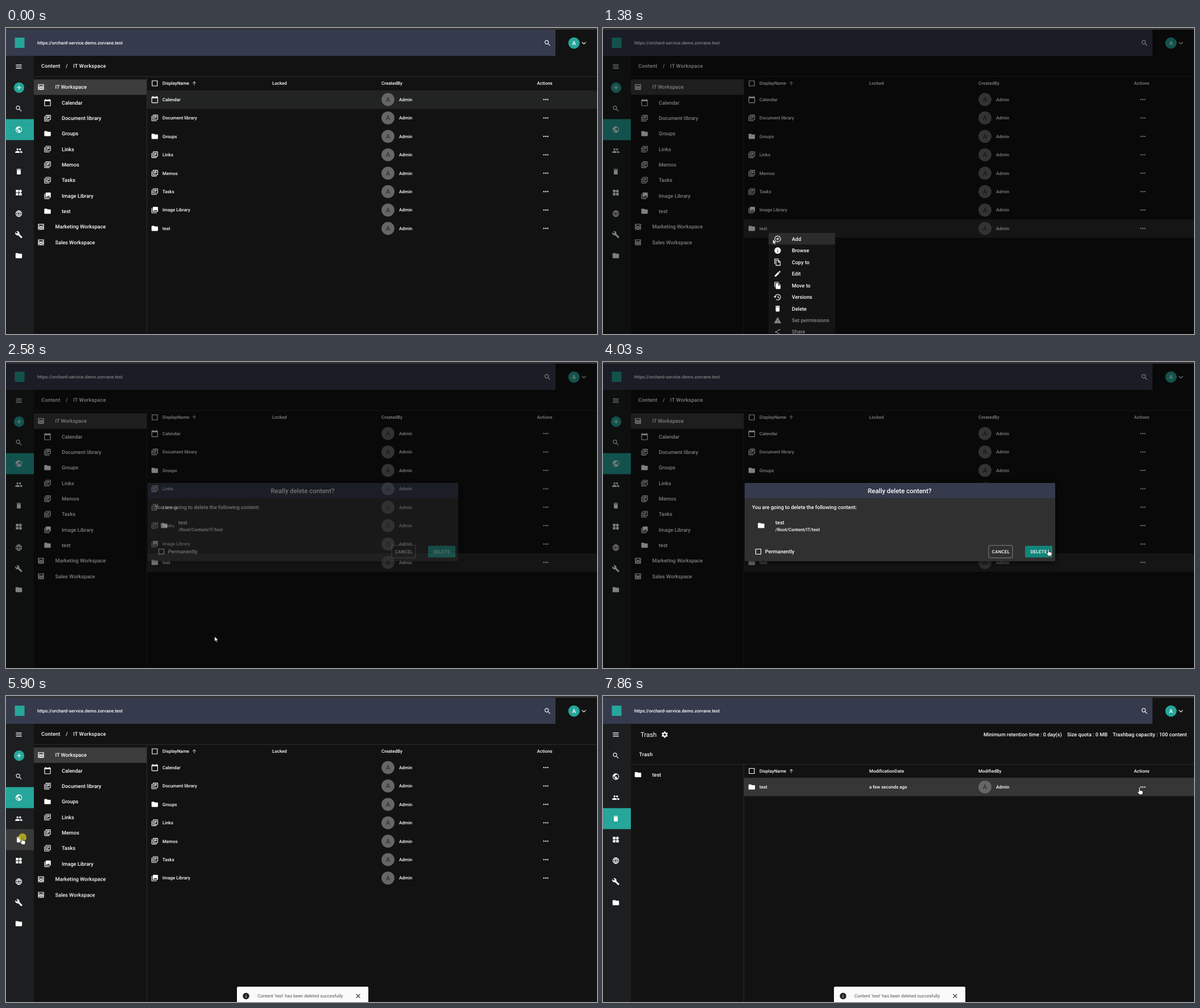
Recreate the animation shown at these times as an HTML page. Size 1039 px wide and 539 px high, loop 8000 ms.

```html
<!DOCTYPE html>
<html lang="en">
<head>
<meta charset="utf-8">
<title>Deleting content</title>
<style>
  html, body { margin: 0; width: 100%; height: 100%; overflow: hidden; background: #121212; }
  svg { display: block; width: 100%; height: 100%; }
  text { font-family: Roboto, Arial, sans-serif; font-weight: 500; text-rendering: geometricPrecision; white-space: pre; }
</style>
</head>
<body>
<svg id="stage" viewBox="0 0 1039 539"></svg>
<script>
const LOOP = 8000;
const TEAL = '#26a69a', BAR = '#363a4d', LINE = '#2d2d2d';
const BODY = 9.1, SMALL = 7.96, TITLE = 11.37;
const SCALE = 0.5685;

// Icons on a 24-unit grid.
const filled = {
  public: 'M12 2a10 10 0 1 0 0 20a10 10 0 1 0 0-20zM11 19.9C7 19.4 4 16 4 12l.2-1.8L9 15v1c0 1.1.9 2 2 2zM17.9 17.4c-.3-.8-1-1.4-1.9-1.4h-1v-3q0-1-1-1H8v-2h2q1 0 1-1V7h2q2 0 2-2v-.4c3 1.2 5 4 5 7.4 0 2-.8 4-2.1 5.4z',
  people: 'M5 8a3 3 0 1 0 6 0a3 3 0 1 0-6 0zM13 8a3 3 0 1 0 6 0a3 3 0 1 0-6 0zM8 13c-2.3 0-7 1.2-7 3.5V19h14v-2.5C15 14.2 10.3 13 8 13zM16 13l-1 .05c1.2.8 2 2 2 3.45V19h6v-2.5C23 14.2 18.3 13 16 13z',
  trash: 'M6 7h12v12q0 2-2 2H8q-2 0-2-2zM19 4h-3.5l-1-1h-5l-1 1H5v2h14z',
  widgets: 'M13 13h8v8h-8zM3 13h8v8H3zM3 3h8v8H3zM16.7 1.7L11 7.3l5.7 5.7 5.6-5.7z',
  build: 'M22.7 19l-9.1-9.1c.9-2.3.4-5-1.5-6.9-2-2-5-2.4-7.4-1.3L9 6 6 9 1.6 4.7C.4 7.1.9 10.1 2.9 12.1c1.9 1.9 4.6 2.4 6.9 1.5l9.1 9.1q.7.6 1.4 0l2.3-2.3q.8-.7.1-1.4z',
  folder: 'M10 4H4Q2 4 2 6v12q0 2 2 2h16q2 0 2-2V8q0-2-2-2h-8z',
  calendar: 'M20 3h-1V1h-2v2H7V1H5v2H4Q2 3 2 5v16q0 2 2 2h16q2 0 2-2V5q0-2-2-2zM20 21H4V8h16z',
  library: 'M4 6H2v14q0 2 2 2h14v-2H4zM20 2H8Q6 2 6 4v12q0 2 2 2h12q2 0 2-2V4q0-2-2-2zM20 16H8V4h12zM10 9h8v2h-8zM10 12h4v2h-4zM10 6h8v2h-8z',
  photos: 'M22 16V4q0-2-2-2H8Q6 2 6 4v12q0 2 2 2h12q2 0 2-2zM11 12l2 2.7L16 11l4 5H8zM2 6v14q0 2 2 2h14v-2H4V6z',
  info: 'M12 2a10 10 0 1 0 0 20a10 10 0 1 0 0-20zM11 7h2v2h-2zM11 11h2v6h-2z',
  move: 'M16 1H4Q2 1 2 3v14h2V3h12zM15 5l6 6v10q0 2-2 2H8q-2 0-2-2V7q0-2 2-2zM14 12h5.5L14 6.5z',
  edit: 'M3 17.25V21h3.75L17.8 9.95l-3.75-3.75zM20.7 7q.6-.7 0-1.4l-2.3-2.3q-.7-.6-1.4 0l-1.9 1.8 3.75 3.75z',
  warning: 'M1 21h22L12 2zM11 10h2v4h-2zM11 16h2v2h-2z'
};
const stroked = {
  menu: 'M3 7h18M3 12h18M3 17h18',
  search: 'M14 14l6 6M15 9.5a5.5 5.5 0 1 1 0-.1',
  globe: 'M12 3a9 9 0 1 0 .1 0zM12 3c-5 5-5 13 0 18c5-5 5-13 0-18M4 9h16M4 15h16',
  workspace: 'M4 4h16v16H4zM4 9h5q0 2.5 3 2.5t3-2.5h5M4 13.5h16M4 16h5q0 2.5 3 2.5t3-2.5h5',
  plus: 'M12 5v14M5 12h14',
  box: 'M4 4h16v16H4z',
  up: 'M5 12l7-7 7 7M12 5v15',
  down: 'M6 9l6 6 6-6',
  close: 'M6 6l12 12M18 6L6 18',
  dots: 'M6 11a1 1 0 1 0 .1 0zM12 11a1 1 0 1 0 .1 0zM18 11a1 1 0 1 0 .1 0z',
  add: 'M12 3a9 9 0 1 0 .1 0zM12 7v10M7 12h10',
  copy: 'M16 2H3v16M7 6h8l5 5v11H7zM14 6v6h6',
  history: 'M4 13a8.5 8.5 0 1 1 3 6M.5 10L4 13.5 7.5 10M13 8v5l4 2.5',
  share: 'M18 5L6 12l12 7M18 4a1 1 0 1 0 .1 0zM6 11a1 1 0 1 0 .1 0zM18 18a1 1 0 1 0 .1 0z',
  gear: 'M12 6.5a5.5 5.5 0 1 0 .1 0zM12 2v4M12 18v4M3.3 7l3.5 2M17.2 15l3.5 2M3.3 17l3.5-2M17.2 9l3.5-2'
};

const rect = (x, y, w, h, fill, extra = '') =>
  `<rect x="${x}" y="${y}" width="${w}" height="${h}" fill="${fill}" ${extra}/>`;
const disc = (x, y, r, fill, extra = '') => `<circle cx="${x}" cy="${y}" r="${r}" fill="${fill}" ${extra}/>`;
const group = (id, ...parts) => `<g id="${id}">${parts.join('')}</g>`;
// y is the middle of the capital letters.
const text = (x, y, str, size = BODY, fill = '#fff', extra = '') =>
  `<text x="${x}" y="${y + size * 0.355}" font-size="${size}" fill="${fill}" ${extra}>${str}</text>`;
const middle = 'text-anchor="middle"';
function icon(name, x, y, color = '#fff', scale = SCALE) {
  const paint = filled[name]
    ? `d="${filled[name]}" fill="${color}" fill-rule="evenodd"`
    : `d="${stroked[name]}" fill="none" stroke="${color}" stroke-width="${name === 'gear' ? 4 : 2}"`;
  return `<path ${paint} transform="translate(${x - 12 * scale} ${y - 12 * scale}) scale(${scale})"/>`;
}

const tools = ['search', 'public', 'people', 'trash', 'widgets', 'globe', 'build', 'folder'];
const nav = (first, active) =>
  rect(0, first + 37 * active - 18.5, 49, 37, TEAL) +
  tools.map((name, i) => icon(name, 22.5, first + 37 * i)).join('');

const treeRow = (i, name, label, depth) => {
  const y = 104 + 27.35 * i;
  return icon(name, depth ? 73 : 61.5, y) + text(depth ? 98 : 86.5, y, label);
};
const person = y => disc(671.5, y, 11.4, '#666') +
  text(671.5, y, 'A', TITLE, '#252525', middle + ' style="font-weight:400"') + text(691, y, 'Admin', SMALL);
const gridRow = (y, name, label) =>
  icon(name, 261.5, y) + text(275, y, label, SMALL) + person(y) + icon('dots', 949, y);
const gridHead = (y, second, third) =>
  icon('box', 261.5, y) + text(275, y, 'DisplayName', SMALL) + icon('up', 331, y, '#fff', 0.42) +
  text(468, y, second, SMALL) + text(660, y, third, SMALL) + text(933.5, y, 'Actions', SMALL);
const frameLines = y => rect(49, y, 990, 1, LINE) + rect(247, y, 1, 539 - y, LINE);
const crumb = (x, y, str) => text(x, y, str, BODY, '#fff', 'letter-spacing=".2"');

const folders = [['calendar', 'Calendar'], ['library', 'Document library'], ['folder', 'Groups'],
  ['library', 'Links'], ['library', 'Memos'], ['library', 'Tasks'], ['photos', 'Image Library']];
const rowY = i => 126 + 32.43 * i;

const header = rect(0, 0, 1039, 3, '#333') + rect(0, 3, 966, 46, BAR) + rect(15.5, 17, 17, 18, TEAL) +
  text(55, 26, 'https://orchard-service.demo.zorvane.test', SMALL) + icon('search', 952, 26.5) +
  disc(998.5, 26.5, 10, TEAL) + text(998.5, 26.5, 'A', 10, '#fff', middle) + icon('down', 1016, 26.5);

const workspace = group('workspace',
  disc(23, 105, 9.2, TEAL), icon('plus', 23, 105),
  group('trashHover', rect(0, 234.5, 49, 37, '#3a3a3a')), nav(142, 1),
  crumb(62, 67, 'Content'), crumb(105, 67, '/'), crumb(118, 67, 'IT Workspace'),
  frameLines(85), rect(49, 90.5, 198, 27.3, '#3c3c3c'),
  treeRow(0, 'workspace', 'IT Workspace', 0),
  folders.map((f, i) => treeRow(i + 1, ...f, 1)).join(''),
  group('treeTest', treeRow(8, 'folder', 'test', 1)),
  group('treeTail', treeRow(9, 'workspace', 'Marketing Workspace', 0), treeRow(10, 'workspace', 'Sales Workspace', 0)),
  gridHead(97.5, 'Locked', 'CreatedBy'),
  group('calendarHover', rect(248, 110, 791, 32.4, '#222423')),
  group('gridTest',
    group('testDim', rect(248, 337, 791, 32.4, '#282a29')),
    group('testHover', rect(248, 337, 791, 32.4, '#323434')),
    group('focusLine', rect(248, 336, 791, 1, '#ddd')),
    gridRow(rowY(7), 'folder', 'test')),
  folders.map((f, i) => gridRow(rowY(i), ...f)).join(''));

const trash = group('trash',
  nav(105, 3),
  text(66, 68, 'Trash', TITLE, '#fff', 'style="font-weight:400"'), icon('gear', 108.5, 68),
  text(669, 68, 'Minimum retention time : 0 day(s)'), text(816, 68, 'Size quota : 0 MB'),
  text(896, 68, 'Trashbag capacity : 100 content'),
  crumb(63.5, 103, 'Trash'), frameLines(120),
  group('trashList',
    icon('folder', 61.5, 138.5), text(86.5, 138.5, 'test'),
    gridHead(132, 'ModificationDate', 'ModifiedBy'),
    group('trashRowHover', rect(248, 144, 791, 32.4, '#363636')),
    gridRow(160.3, 'folder', 'test'), text(468, 160.3, 'a few seconds ago', SMALL)));

const MENU_TOP = 361, ITEM = 20.47;
const actions = [['add', 'Add'], ['info', 'Browse'], ['copy', 'Copy to'], ['edit', 'Edit'], ['move', 'Move to'],
  ['history', 'Versions'], ['trash', 'Delete'], ['warning', 'Set permissions'], ['share', 'Share']];
const menu = group('menu',
  rect(291, MENU_TOP, 117, 180, '#141414'),
  rect(291, MENU_TOP, 117, ITEM, '#2c2c2c', 'id="itemHover"'),
  actions.map(([name, label], i) => {
    const y = 371.5 + ITEM * i, color = i > 6 ? '#8a8a8a' : '#fff';
    return icon(name, 307, y, color) + text(332, y, label, BODY, color);
  }).join(''));

function dialog(id, title, top, bottom, busy) {
  const foot = bottom - 17, ink = busy ? '#8f8f8f' : '#fff';
  const label = (x, str) => text(x, foot, str, SMALL, ink, middle + ' letter-spacing=".22"');
  return group(id,
    rect(249, top, 546, bottom - top, '#303030', 'rx="2" style="filter:drop-shadow(0 3px 6px #000a)"'),
    rect(249, top, 546, 27, BAR, 'rx="2"'),
    text(521.5, top + 13.8, title, TITLE, '#fff', middle),
    text(262, top + 43, 'You are going to delete the following content:'),
    icon('folder', 278, top + 75), text(303, top + 69.3, 'test'),
    text(303, top + 81.7, '/Root/Content/IT/test', SMALL),
    busy ? rect(262, 311.8, 519, 2.3, '#17544f') +
      `<g clip-path="url(#track)">${rect(0, 311.8, 1, 2.3, TEAL, 'id="progress"')}</g>` : '',
    icon('box', 273, foot, ink), text(285, foot, 'Permanently', BODY, busy ? '#aaa' : '#fff'),
    rect(678, foot - 11, 42, 22, 'none', `rx="2" stroke="${busy ? '#666' : '#999'}" stroke-width=".8"`),
    label(699.5, 'CANCEL'),
    rect(742, foot - 10.3, 48, 20.6, busy ? '#505050' : TEAL, busy ? 'rx="2"' : 'rx="2" id="deleteButton"'),
    label(766, 'DELETE'));
}

const toast = group('toast',
  rect(406, 512, 231, 30, '#fafafa', 'rx="2"'), icon('info', 422, 528.5, '#222'),
  text(442, 528.5, "Content 'test' has been deleted succesfully", SMALL, '#555', 'style="font-weight:400"'),
  icon('close', 619, 528.5, '#222'));

const shape = (id, d) => `<path id="${id}" d="${d}" fill="#fff" stroke="#111" stroke-width=".7"/>`;
const pointer = group('pointer',
  disc(1, 0, 7, '#d0c312', 'id="click" fill-opacity=".78"'),
  shape('hand', 'M-1 1.2q0-1.7 1-1.7t1 1.7v4l4 1q1.5.4 1.2 2l-.8 4.5h-5l-4-4.3q.2-1.4 1.5-.8l1.1.8z'),
  shape('arrow', 'M0 0v9l2.1-2 1.4 3.2 1.5-.7-1.4-3h2.9z'),
  '<path id="beam" d="M-2-5h4M0-5v9M-2 4h4" fill="none" stroke="#ddd" stroke-width=".8"/>');

document.getElementById('stage').innerHTML =
  '<clipPath id="track"><rect x="262" y="310" width="519" height="6"/></clipPath>' +
  rect(0, 0, 1039, 539, '#121212') + rect(0, 49, 49, 490, '#1d1e1f') + icon('menu', 22.5, 68) +
  header + workspace + trash + rect(0, 3, 1039, 536, '#000', 'id="backdrop" fill-opacity=".5"') + menu +
  dialog('ask', 'Really delete content?', 213, 351, false) +
  dialog('busy', 'Deleting content...', 212, 352, true) + toast + pointer;

// Each step is [ms, value, easing up to the next step]; without easing the value holds.
// Times start at 0 and are all different.
function play(id, prop, steps) {
  const frames = steps.map(([ms, value, easing = 'step-end']) => ({ offset: ms / LOOP, [prop]: value, easing }));
  frames.push({ offset: 1, [prop]: steps.at(-1)[1] });
  document.getElementById(id).animate(frames, { duration: LOOP, iterations: Infinity });
}

function show(id, from, to, fadeIn = 0, fadeOut = 0) {
  const steps = from > 0 ? [[0, 0]] : [];
  if (fadeIn) steps.push([from, 0, 'linear']);
  steps.push([from + fadeIn, 1]);
  if (fadeOut) steps.push([to, 1, 'linear']);
  if (to < LOOP) steps.push([to + fadeOut, 0]);
  play(id, 'opacity', steps);
}
const at = (x, y) => `translate(${x}px, ${y}px)`;

show('calendarHover', 0, 220);
show('testHover', 820, 1070);
show('focusLine', 890, 1070);
show('testDim', 1070, 5300);
show('backdrop', 1070, 5140, 210, 70);
show('menu', 1070, 2450, 180, 80);
play('itemHover', 'transform', [[0, at(0, 0)],
  ...actions.slice(0, 7).map((_, i) => [1313 + 134 * i, at(0, ITEM * i)])]);

show('ask', 2490, 4320, 210);
play('deleteButton', 'fill', [[0, TEAL], [3960, '#11857a']]);
show('busy', 4320, 5140, 0, 70);
const bar = (left, width) => `translateX(${262 + 5.19 * left}px) scaleX(${5.19 * width})`;
play('progress', 'transform', [[0, bar(-35, 35)],
  [4320, bar(-35, 35), 'cubic-bezier(.65,.815,.735,.395)'], [5580, bar(100, 90)]]);

show('treeTest', 0, 5300);
show('gridTest', 0, 5300);
play('treeTail', 'transform', [[0, at(0, 0)], [5300, at(0, -27.35)]]);
play('toast', 'transform', [[0, at(0, 32)], [5430, at(0, 32), 'ease-out'], [5650, at(0, 0)]]);
show('trashHover', 5720, 6150);
show('workspace', 0, 6150);
show('trash', 6150, LOOP);
show('trashList', 6300, LOOP);
show('trashRowHover', 7160, LOOP);

const glide = 'steps(10, jump-start)';
play('pointer', 'transform', [
  [0, at(400, 560)], [220, at(400, 545), glide], [900, at(291, 358.5)],
  [1300, at(291, 359), glide], [2150, at(366.5, 489)],
  [2520, at(366.5, 489), 'steps(3, jump-start)'], [2730, at(367, 472)],
  [2790, at(367, 472), glide], [3590, at(506, 326)],
  [3710, at(506, 326), 'steps(4, jump-start)'], [4000, at(783, 329)],
  [4490, at(783, 329), glide], [5110, at(267, 250)],
  [5300, at(267, 250), 'steps(7, jump-start)'], [5800, at(28, 249)],
  [6150, at(28, 249), 'steps(5, jump-start)'], [6530, at(322, 243)],
  [6940, at(388, 206)], [7160, at(614, 167)], [7480, at(898, 167)],
  [7760, at(921, 164)], [7860, at(943, 161)]]);
const looks = [[0, 'arrow'], [820, 'hand'], [1100, 'arrow'], [3960, 'hand'], [4350, 'arrow'], [5060, 'beam'],
  [5300, 'arrow'], [5720, 'hand'], [6300, 'arrow'], [7160, 'hand']];
for (const id of ['arrow', 'hand', 'beam'])
  play(id, 'opacity', looks.map(([ms, look]) => [ms, +(look === id)]));
show('click', 5860, 6000);
</script>
</body>
</html>
```
